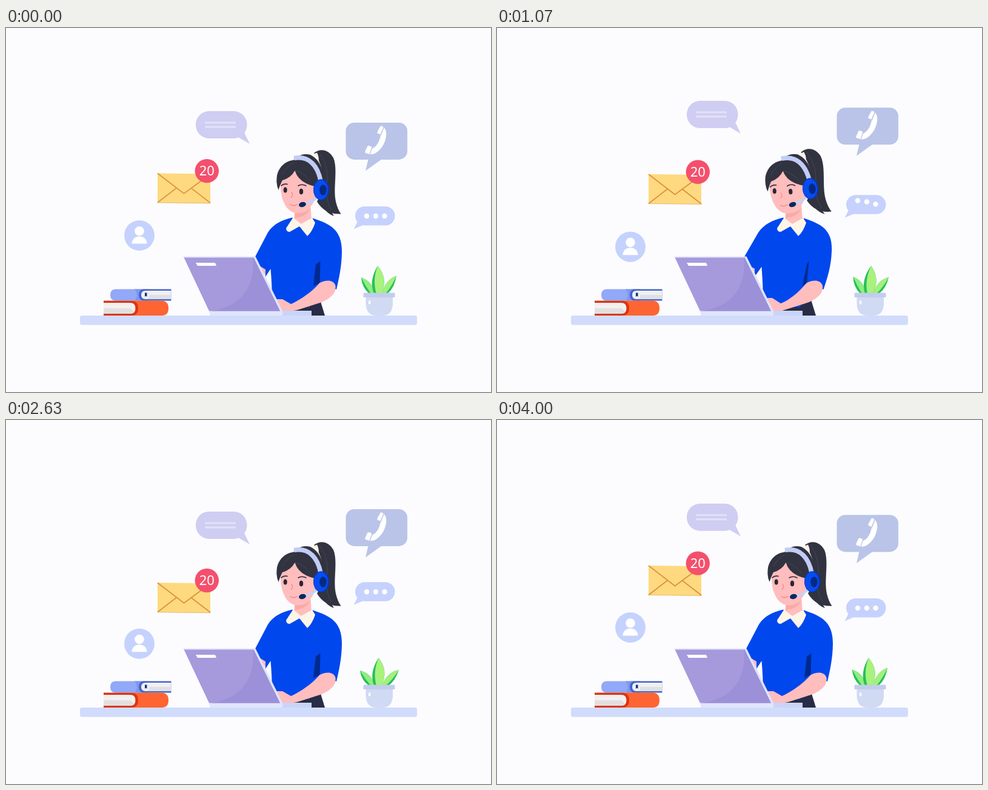
An HTML page for the animation above (4030 ms loop, 800 by 600 pixels).

```html
<!DOCTYPE html>
<html lang="en">
<head>
<meta charset="utf-8">
<title>Support desk</title>
<style>
  html, body { margin: 0; width: 100%; height: 100%; overflow: hidden; background: #fcfcff; }
  svg { display: block; width: 800px; height: 600px; }
  text { font: 22px "Noto Sans", "Open Sans", sans-serif; }
  .line { fill: none; stroke-linecap: round; stroke-linejoin: round; }
  .hair { fill: #323340; }
  .skin { fill: #ffbdbd; }
</style>
</head>
<body>
<svg viewBox="0 0 800 600">
  <rect width="800" height="600" fill="#fcfcff"/>

  <g id="chat">
    <path d="M383 180L402 191L391 168Z" fill="#cfcdf1"/>
    <rect x="313" y="137" width="84.500" height="45" rx="22" fill="#cfcdf1"/>
    <path class="line" d="M329.500 156H377.500M329.500 163H377.500" stroke="#e1e0f9" stroke-width="3.500"/>
  </g>

  <g id="phone">
    <path d="M598 214L593 235.500L623 214Z" fill="#b9c4e8"/>
    <rect x="560.500" y="156" width="101.500" height="61" rx="14" fill="#b9c4e8"/>
    <g fill="#fff">
      <path d="M622.500 163.500C630 168 628 184 621 195C614 205 606 209.500 599.500 208L603.500 199C611 195.500 616 188 618 176.500Z"/>
      <path d="M617.500 162Q619 160.500 622.500 163L617.500 175.500L612.500 173.500Q612 172 613 170Z"/>
      <path d="M596.500 194.500Q598 193 603.500 196L599.500 208L593 206Q591.500 205 592.500 203Z"/>
    </g>
    <path class="line" d="M623.500 163L618.300 176.500M604 196.500L600 208.500" stroke="#b9c4e8" stroke-width="1.200"/>
  </g>

  <g id="typing">
    <path d="M581 317L573.500 331.500L591 324Z" fill="#c6d2fd"/>
    <rect x="576" y="294" width="65.500" height="31.500" rx="15.700" fill="#c6d2fd"/>
    <g fill="#fff">
      <circle class="dot" cx="595" cy="310" r="4.200"/>
      <circle class="dot" cx="610" cy="310" r="4.200"/>
      <circle class="dot" cx="624.500" cy="310" r="4.200"/>
    </g>
  </g>

  <g id="mail">
    <path d="M250 239.500L337 240.500V289L250 288Z" fill="#ffd97f"/>
    <path class="line" d="M250.500 240L293.500 273L337 241M250.500 287.500L281 264M336.500 288L306 264.500" stroke="#d9933f" stroke-width="1.800"/>
    <path class="line" d="M250.300 288L337 289" stroke="#e2ad58" stroke-width=".8"/>
    <circle cx="331.300" cy="235.700" r="19.700" fill="#f4506d"/>
    <text x="331.300" y="243.500" fill="#fff" text-anchor="middle">20</text>
  </g>

  <g id="user">
    <circle cx="220" cy="342" r="25" fill="#c5d2fd"/>
    <circle cx="220" cy="334.700" r="7.800" fill="#fff"/>
    <path d="M207.500 355.500C207.500 348 213 343.500 220 343.500S232.500 348 232.500 355.500Z" fill="#fff"/>
  </g>

  <rect x="122" y="474" width="556" height="15.500" rx="3" fill="#d1dcfc"/>

  <g id="books">
    <path d="M181 430.500H236V449.500H181Q172 449.500 172 440T181 430.500Z" fill="#92a8f8"/>
    <path d="M212 430.500H228V449.500H212Q220 440 212 430.500Z" fill="#7f97ee"/>
    <path d="M272.500 430.500H228Q219 430.500 219 440T228 449.500H272.500Z" fill="#4465cd"/>
    <path d="M272.500 433H230Q223 433 223 440T230 447H272.500Z" fill="#f0f0f2"/>
    <path d="M236 440H272.500V447H230Q238 446 236 440Z" fill="#dfdfe4"/>
    <path d="M229 436.500H232.500V443L230.700 441.500L229 443Z" fill="#16307f"/>
    <path d="M208 449.500H257Q268 450 268 462T257 474H208Z" fill="#ff6433"/>
    <path d="M161 449.500H207Q218 450 218 462T207 474H161Z" fill="#dc3410"/>
    <path d="M161 453H205Q213.500 453 213.500 462T205 471H161Z" fill="#f2f0f0"/>
    <path d="M161 462H206L211 468Q208 471 205 471H161Z" fill="#e2dfdf"/>
  </g>

  <g id="plant">
    <g id="leafL">
      <path d="M585.500 411.500Q605 418 608 438H599Q587 428 585.500 411.500Z" fill="#27c05a"/>
      <path d="M585.500 411.500Q605 418 608 438H602Q593 426 585.500 411.500Z" fill="#8fee7f"/>
    </g>
    <g id="leafR">
      <path d="M646.300 410.500Q627 416 620 438H630Q642 429 646.300 410.500Z" fill="#27c05a"/>
      <path d="M646.300 410.500Q627 416 620 438H626Q639 425 646.300 410.500Z" fill="#a2f07c"/>
    </g>
    <g id="leafM">
      <path d="M615 392Q599 416 607 438H619Q632 414 615 392Z" fill="#27c05a"/>
      <path d="M615 392Q605 416 611 438H619Q632 414 615 392Z" fill="#a8f27e"/>
    </g>
    <path d="M593.500 443H638V455Q637 474 621 474H611Q594.500 474 593.500 455Z" fill="#d0daf3"/>
    <rect x="589.500" y="436.500" width="52" height="7.500" rx="1.500" fill="#c2cdec"/>
    <rect x="598" y="449" width="3.200" height="6.500" rx="1.600" fill="#fff"/>
  </g>

  <g id="person">
    <path d="M462 455L518 448L526 474H462Z" fill="#292c46"/>
    <path id="handL" class="skin" d="M414 388L428 396Q429 405 426 411L419 406Z"/>
    <path id="torso" fill="#0047ee"/>
    <path id="sleeve" fill="#0047ee"/>
    <path id="fold" fill="#00298f"/>
    <path id="arm" class="skin"/>
    <path class="skin" d="M477 295L502 290L504 316L486 326L475 315Z"/>
    <path d="M477 305Q492 307 502 297Q497 311 477 313Z" fill="#f9aaa5"/>
    <path d="M473.500 312.500L462 330Q462 336 468 336L484 327L497 343Q505 336 510 321L505 313L487 323Z" fill="#fdf5e8"/>

    <g id="head">
      <path class="hair" d="M508 206C519 197 533 201 540 214C548 233 539 264 544 286Q547 299 552.500 306.500Q526 308 513 286Q527 262 522 238Q518 217 508 206Z"/>
      <path class="hair" d="M517 285Q526 305 541 310Q531 297 533 280Z"/>
      <path class="line" d="M518 207Q534 229 529 262M531 263Q525 282 537 300" stroke="#4a4b5a" stroke-width=".8"/>
      <path class="hair" d="M474 218Q486 205 502 209Q523 219 525 254L510 284L503 280L470 240Z"/>
      <path d="M504 209L513 205.500Q516 211 516 218Q511 211 504 209Z" fill="#fbf0e3"/>
      <path class="skin" d="M453 248C452 268 454 283 463 296Q472 307 485 305Q502 300 510 282L513 258L480 226L456 240Z"/>
      <path class="hair" d="M480 217.500C463 217 451 227 447 243Q445 258 449.500 267Q453 256 456 251Q470 247 476.500 235Q481 250 497 257Q505 261 516 262L517 240Q506 215 480 217.500Z"/>
      <path class="line" d="M476.500 235Q490 237 502 252M475 222Q462 229 456 241" stroke="#4a4b5a" stroke-width=".8"/>
      <path class="line" d="M454 260Q458 256 464 257.500M482 260Q488 256.500 495 260" stroke="#30293a" stroke-width="1.600"/>
      <ellipse cx="460.700" cy="267" rx="3" ry="4.500" fill="#2b2635"/>
      <ellipse cx="487" cy="269.500" rx="3.200" ry="4.700" fill="#2b2635"/>
      <path class="line" d="M471 271Q475 276 470 279M469 291Q474 294.500 480 291" stroke="#ef8985" stroke-width="1.300"/>
      <path d="M475 214.500C500 210 514 227 519 252" fill="none" stroke="#c1cdf6" stroke-width="7.500"/>
      <path class="line" d="M514 279Q506 286 493 290" stroke="#c1d3fa" stroke-width="4"/>
      <ellipse cx="489" cy="291" rx="6" ry="4" fill="#062762" transform="rotate(-14 489 291)"/>
      <ellipse cx="520" cy="266.500" rx="13" ry="17.300" fill="#0038c4"/>
      <ellipse cx="519.500" cy="266.500" rx="11.500" ry="16.300" fill="#064cf0"/>
      <ellipse cx="523" cy="267" rx="5.800" ry="8.800" fill="#042a86"/>
    </g>
  </g>

  <g id="laptop">
    <path d="M335 466H504V474H337Z" fill="#c9d4f8"/>
    <path d="M335 466H456V474H337Z" fill="#dfe5fb"/>
    <path d="M292 376.500H411.500L456.500 467H451L406 379H294Z" fill="#dfe4fb"/>
    <path d="M293.500 378.500H408.500L452 466.500H335Z" fill="#a69add"/>
    <path d="M407.500 378.500H408.500L452 466.500H338Q412 455 407.500 378.500Z" fill="#9c90d8"/>
    <path d="M313 387H345L347 392H316Z" fill="#fff"/>
  </g>
</svg>

<script>
  const LOOP = 4030;
  const el = id => document.getElementById(id);
  const dots = document.querySelectorAll('.dot');

  // Pose tables: [time, value]
  const headTurn = [[0, 0], [600, -3.5], [1700, -3.5], [2150, 0], [LOOP, 0]];
  const elbow = [[0, 0], [630, -4], [1070, -6.5], [1670, -1.5], [2140, 0], [LOOP, 0]];
  const farArm = [[0, 0], [630, 1.5], [1070, -3], [1670, -8], [2140, 0], [LOOP, 0]];
  const nearHand = [[0, 0], [630, 0], [1070, -2], [1670, -5], [2140, 0], [LOOP, 0]];

  function pose(keys, t) {
    const i = keys.findIndex(k => k[0] > t);
    const [t0, a] = keys[i - 1], [t1, b] = keys[i];
    const p = (t - t0) / (t1 - t0);
    return a + (b - a) * p * p * (3 - 2 * p);
  }

  // Cosine swing that peaks at the given time
  const swing = (t, peak) => Math.cos((t - peak) / LOOP * 2 * Math.PI);
  const float = (id, y) => el(id).setAttribute('transform', `translate(0 ${y})`);
  const turn = (id, deg, x, y) => el(id).setAttribute('transform', `rotate(${deg} ${x} ${y})`);
  const shape = (id, d) => el(id).setAttribute('d', d);

  function drawBody(t) {
    const e = pose(elbow, t), l = pose(farArm, t), h = pose(nearHand, t);
    turn('head', pose(headTurn, t), 488, 315);
    el('handL').setAttribute('transform', `translate(${l} 0)`);
    shape('torso', `M472 312.5C454 317 441 323 ${432 + .3 * l} 337L${411 + l} 377L${418 + l} 392
      L${428 + l} ${398 + l / 2}L${428 + l} 410L${436.5} ${397 + 1.2 * l}Q438.5 420 439 447L462 460H500
      L519 425L530 335Q520 318 506 313.5L486 325Z`);
    shape('sleeve', `M507 314C535 323 554 333 ${554 + .3 * e} 368
      C${554 + .4 * e} 392 ${549 + .7 * e} 414 ${545 + e} 431L${517 + e} 420
      L${518 + .6 * e} 384L500 330Z`);
    shape('fold', `M511 390L${518.5 + .6 * e} 384L${517.5 + e} 420L${507 + .5 * e} 425Z`);
    shape('arm', `M${517 + e} 420.5C${527 + e} 414.5 ${541 + e} 414.5 ${543.5 + e} 425
      C${545 + e} 437 ${536 + e} 445 ${521 + e} 452L${480 + e} 465Q470 467 ${454 + h} 467
      L${445 + h} ${447 + h}L${456 + h} ${447 + h}L${470 + h} ${455 + h / 2}
      C${484 + h} 449 ${505 + e} 435 ${517 + e} 420.5Z`);
  }

  function draw(t) {
    float('chat', -17 * swing(t, LOOP / 4));
    float('phone', -11.9 - 16.6 * swing(t, 1515));
    float('mail', 12.1 - 17 * swing(t, 495));
    float('user', 17 - 17 * swing(t, 0));
    float('typing', -17 + 17 * swing(t, 0));

    dots.forEach((dot, i) => {
      const p = (t - 850 - i * 100) / 500;
      dot.setAttribute('cy', 310 - (p > 0 && p < 1 ? 7 * Math.sin(p * Math.PI) : 0));
    });

    turn('leafL', 4.5 * swing(t, 900), 606, 437);
    turn('leafM', 3.6 * swing(t, 1520), 614, 437);
    turn('leafR', 5 * swing(t, 2100), 622, 437);
    drawBody(t);
  }

  const start = performance.now();
  function tick() {
    draw((performance.now() - start) % LOOP);
    requestAnimationFrame(tick);
  }
  tick();
</script>
</body>
</html>
```
